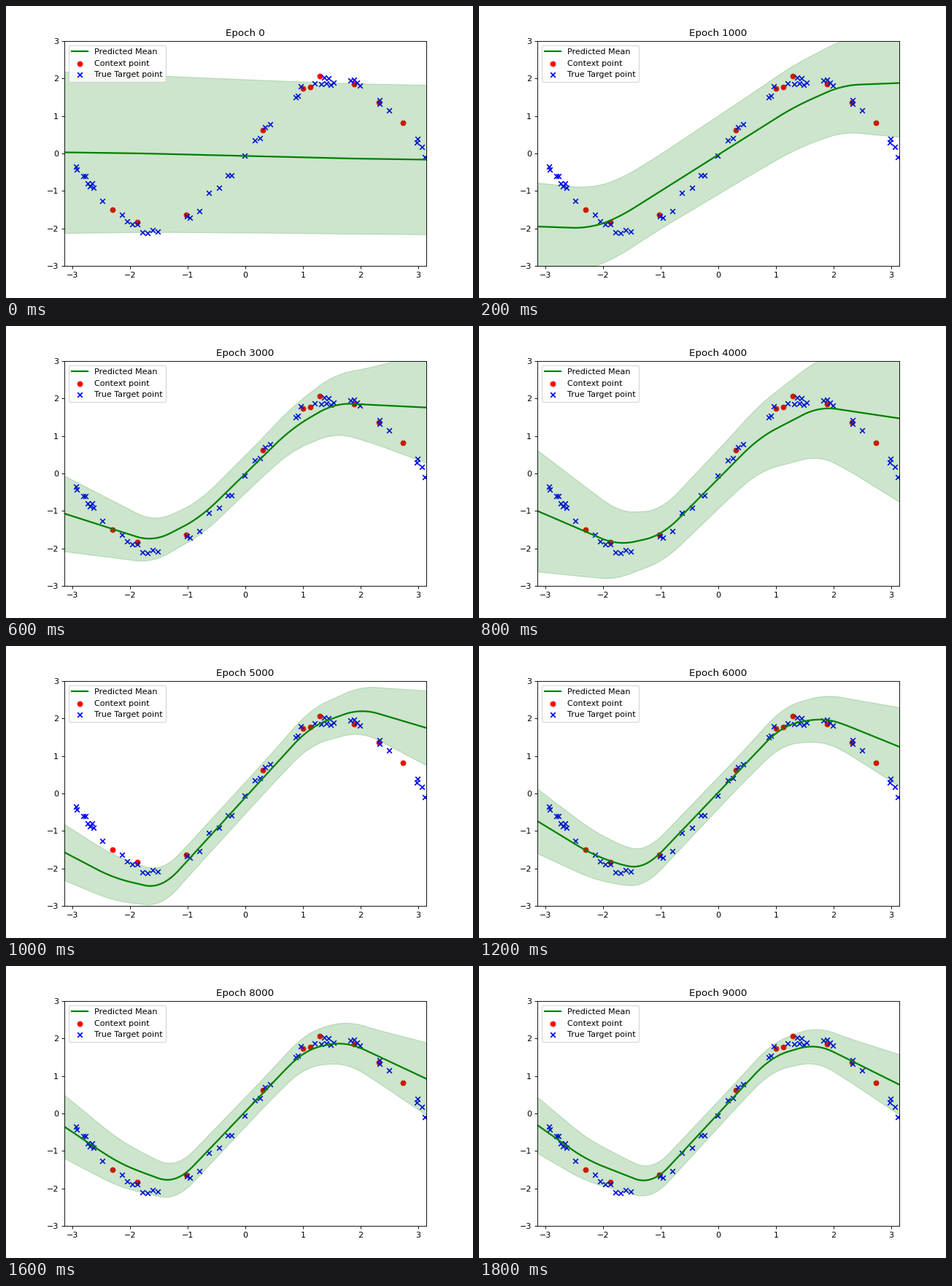
A matplotlib script for the animation above (2 s loop, 640x400 px).

```python
import numpy as np
import matplotlib.pyplot as plt
from matplotlib.animation import FuncAnimation

PI = np.pi
GRID = np.linspace(-PI, PI, 400)
STD_X = (-PI, -1.3, 0.6, 2.0, PI)

# Runs of evenly spaced target positions: first, last, count
RUNS = [(-2.945, -2.93, 2), (-2.81, -2.63, 6), (-2.48, -2.48, 1),
        (-2.14, -1.52, 8), (-1.01, -.96, 2), (-.80, -.46, 3),
        (-.30, -.24, 2), (-.01, -.01, 1), (.17, .43, 4), (.87, .96, 3),
        (1.20, 1.20, 1), (1.32, 1.53, 6), (1.83, 1.99, 4), (2.33, 2.33, 2),
        (2.49, 2.49, 1), (2.98, 2.99, 2), (3.07, 3.12, 2)]

CONTEXT = np.array([
    (-2.3, -1.5), (-1.88, -1.83), (-1.02, -1.64), (.31, .62), (1.0, 1.73),
    (1.13, 1.77), (1.295, 2.06), (1.89, 1.85), (2.32, 1.36), (2.74, .82)])

target_x = np.concatenate([np.linspace(*run) for run in RUNS])
noise = np.random.RandomState(42).normal(0, 0.08, target_x.size)
target_y = 2 * np.sin(target_x) + noise


def hinge(d, r):
    """Ramp max(d, 0) with its corner rounded over [-r, r]."""
    return np.clip(d + r, 0, 2 * r) ** 2 / (4 * r) + np.maximum(d - r, 0)


def bend(xs, ys, r):
    """Straight pieces through the points, joined by rounded corners."""
    slopes = np.diff(ys) / np.diff(xs)
    curve = ys[0] + slopes[0] * (GRID - xs[0])
    for x, turn in zip(xs[1:-1], np.diff(slopes)):
        curve += turn * hinge(GRID - x, r)
    return curve


def fit(left, corners, right, std):
    xs, ys = zip((-PI, left), *corners, (PI, right))
    return np.array([bend(xs, ys, 0.3), bend(STD_X, std, 0.5)])


def blend(a, b, w):
    return (1 - w) * a + w * b


start = fit(.03, [(-1.9, .005), (1.8, -.135)], -.165,
            [2.155, 2.08, 2.03, 2.005, 1.995])
e1 = fit(-1.95, [(-2.25, -2.0), (-1.75, -1.73), (1.3, 1.23), (2.15, 1.82)],
         1.88, [1.17, .98, 1.08, 1.2, 1.44])
e3 = fit(-1.07, [(-1.6, -1.83), (-.78, -1.18), (.8, 1.2), (1.55, 1.88)],
         1.76, [1.01, .46, .53, .91, 1.48])
e4 = fit(-1.0, [(-1.75, -1.92), (-.98, -1.66), (.7, .95), (1.75, 1.79)],
         1.47, [1.62, .69, .84, 1.4, 2.23])
e5 = fit(-1.57, [(-2.3, -2.25), (-1.46, -2.56), (1.12, 1.78), (2.0, 2.27)],
         1.75, [.75, .43, .42, .59, 1.0])
e7 = fit(-.38, [(-2.1, -1.42), (-1.25, -1.89), (1.1, 1.83), (1.8, 1.96)],
         1.03, [.91, .45, .41, .67, 1.08])
e9 = fit(-.31, [(-2.3, -1.23), (-1.16, -1.92), (.92, 1.52), (1.7, 1.87)],
         .77, [.75, .38, .34, .5, .81])

FITS = [start, e1, blend(e1, e3, .5), e3, e4, e5,
        blend(e5, e7, .7), e7, blend(e7, e9, .4), e9]

fig, ax = plt.subplots(figsize=(8, 5), dpi=80)


def draw(i):
    mean, std = FITS[i]
    ax.clear()
    ax.plot(GRID, mean, color="green", linewidth=2, label="Predicted Mean")
    ax.scatter(*CONTEXT.T, color="red", label="Context point")
    ax.scatter(target_x, target_y, color="blue", marker="x",
               label="True Target point")
    ax.fill_between(GRID, mean - std, mean + std, color="green", alpha=0.2)
    ax.set_xlim(-PI, PI)
    ax.set_ylim(-3, 3)
    ax.set_title(f"Epoch {i * 1000}")
    ax.legend(loc="upper left")


anim = FuncAnimation(fig, draw, frames=len(FITS), init_func=lambda: None,
                     interval=200, repeat=True, repeat_delay=0)
plt.show()
```
